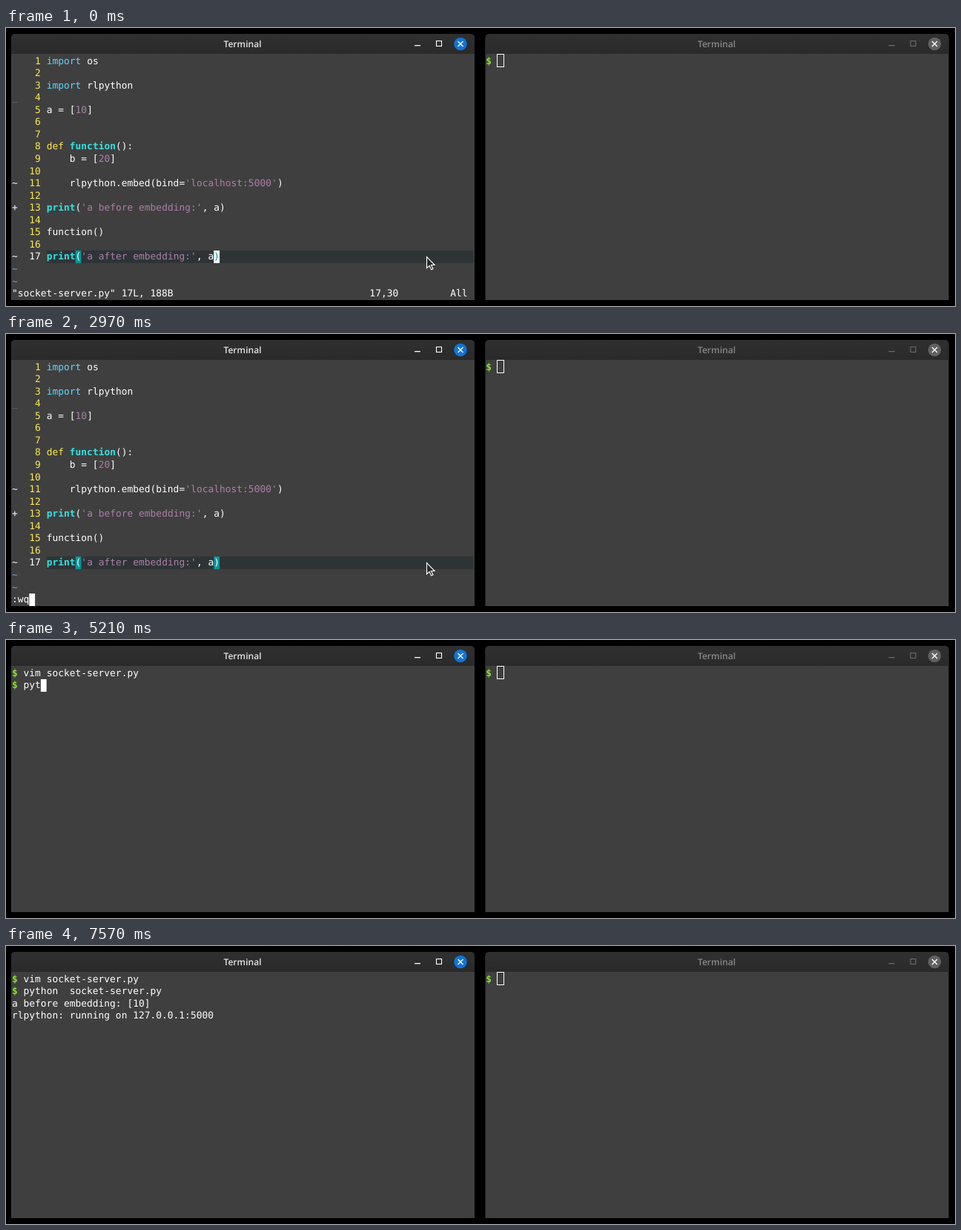
Recreate the animation shown at these times as an HTML page. Size 1280 px wide and 376 px high, loop 8000 ms.

```html
<!DOCTYPE html>
<html lang="en">
<head>
<meta charset="utf-8">
<title>Terminal</title>
<style>
  html, body { margin: 0; width: 100%; height: 100%; overflow: hidden; background: #000; }
  svg { display: block; width: 1280px; height: 376px; }
  text { white-space: pre; text-rendering: geometricPrecision; }
  .mono { font: 12.925px "DejaVu Sans Mono", monospace; fill: #fff; }
  .title { font: 600 12.1px "Open Sans", "Noto Sans", sans-serif; text-anchor: middle; }
  .mono.bold { font-weight: 700; }
</style>
</head>
<body>
<svg id="stage" viewBox="0 0 1280 376">
  <defs>
    <linearGradient id="bar" x2="0" y2="1">
      <stop offset="0" stop-color="#303030"/>
      <stop offset="1" stop-color="#2a2a2a"/>
    </linearGradient>
  </defs>
</svg>
<script>
const CELL = 7.78, LINE = 16.55, TOP = 36.3, BASE = 12.3;
const LEFT = 8, RIGHT = 647.3, LOOP = 8000;
const C = {
  white: '#fff', yellow: '#fce94f', cyan: '#34e2e2', sky: '#5fd7ff', string: '#ad7fa8',
  teal: '#06989a', blue: '#729fcf', green: '#8ae234', current: '#2e3436', dim: '#777'
};
const stage = document.getElementById('stage');

function add(parent, tag, attrs, content = '') {
  const node = document.createElementNS('http://www.w3.org/2000/svg', tag);
  for (const key in attrs) node.setAttribute(key, attrs[key]);
  node.textContent = content;
  return parent.appendChild(node);
}

const group = () => add(stage, 'g', {});
const show = (node, on) => node.setAttribute('visibility', on ? 'visible' : 'hidden');

function put(parent, row, col, content, fill = C.white, bold = false, left = LEFT) {
  return add(parent, 'text', {
    class: bold ? 'mono bold' : 'mono', style: `fill:${fill}`,
    x: left + col * CELL, y: TOP + row * LINE + BASE
  }, content);
}

function block(parent, row, col, fill, cells = 1) {
  const y = Math.round(TOP + row * LINE);
  return add(parent, 'rect', {
    x: LEFT + col * CELL, y, width: cells * CELL,
    height: Math.round(TOP + (row + 1) * LINE) - y, fill
  });
}

function frame(x, titleFill, iconFill, closeFill) {
  add(stage, 'path', { d: `M${x} 368V14q0-6 6-6h613q6 0 6 6v354z`, fill: '#3f3f3f' });
  add(stage, 'path', { d: `M${x} 35V14q0-6 6-6h613q6 0 6 6v21z`, fill: 'url(#bar)' });
  add(stage, 'text', { class: 'title', x: x + 312, y: 26, fill: titleFill }, 'Terminal');
  add(stage, 'rect', { x: x + 544, y: 23, width: 8, height: 1.3, fill: iconFill });
  add(stage, 'rect', {
    x: x + 573.5, y: 17.5, width: 7, height: 7, fill: 'none', stroke: iconFill, 'stroke-width': 1.1
  });
  add(stage, 'circle', { cx: x + 606, cy: 21.5, r: 8.7, fill: closeFill });
  add(stage, 'path', {
    d: `M${x + 602.5} 18l7 7m0-7l-7 7`, stroke: '#fff', 'stroke-width': 1.4, fill: 'none'
  });
}

frame(7, '#e4e4e4', '#fff', '#1074d8');
frame(646.5, '#888', '#6a6a6a', '#616161');
put(stage, 0, 0, '$', C.green, true, RIGHT);
add(stage, 'rect', { x: 662.5, y: 35.5, width: 9, height: 17, fill: 'none', stroke: '#fff' });

// Editor
const source = `import os

import rlpython

a = [10]


def function():
    b = [20]

    rlpython.embed(bind='localhost:5000')

print('a before embedding:', a)

function()

print('a after embedding:', a)`.split('\n');

const TOKENS = /'[^']*'|\d+|^import|^def|^print|(?<=def )\w+|[^'\d]+?(?=['\d]|$|(?<=def )\w)/g;

function style(token) {
  if (/^['\d]/.test(token)) return [C.string];
  if (token === 'import') return [C.sky];
  if (token === 'def') return [C.yellow];
  if (token === 'print' || token === 'function') return [C.cyan, true];
  return [C.white];
}

const editor = group();
block(editor, 16, 6, C.current, 74);
block(editor, 16, 11, C.teal);
block(editor, 16, 35, C.teal);
source.forEach((line, row) => {
  put(editor, row, 2, String(row + 1).padStart(3), row === 16 ? C.white : C.yellow);
  if (line === 'function()') return put(editor, row, 6, line);
  for (const match of line.matchAll(TOKENS)) {
    put(editor, row, 6 + match.index, match[0], ...style(match[0]));
  }
});
put(editor, 3, 0, '_', C.dim);
put(editor, 10, 0, '~');
put(editor, 12, 0, '+');
put(editor, 16, 0, '~');
put(editor, 17, 0, '~', C.blue);
put(editor, 18, 0, '~', C.blue);
const status = add(editor, 'g', {});
put(status, 19, 0, '"socket-server.py" 17L, 188B');
put(status, 19, 62, '17,30');
put(status, 19, 76, 'All');
const command = put(editor, 19, 0, '');
add(editor, 'path', {
  d: 'M567.5 309.5v15.2l3.6-3.3 2.5 5.4 2.4-1.1-2.5-5.2h4.6z',
  fill: '#292929', stroke: '#fff', 'stroke-width': 1.1
});

// Shell
const shell = group();
put(shell, 0, 0, '$', C.green, true);
put(shell, 0, 2, 'vim socket-server.py');
put(shell, 1, 0, '$', C.green, true);
const typed = put(shell, 1, 2, '');
const output = add(shell, 'g', {});
put(output, 2, 0, 'a before embedding: [10]');
put(output, 3, 0, 'rlpython: running on 127.0.0.1:5000');

const cursor = block(stage, 0, 0, '#fff');
const underCursor = put(stage, 16, 35, ')', C.teal);

// Each row: start time, view, typed text, cursor shown
const run = 'python  socket-server.py';
const steps = [
  [0, 'edit', '', true], [80, 'edit', '', false],
  [660, 'edit', '', true], [1320, 'edit', '', false], [1900, 'edit', '', true],
  [2650, 'command', ':', true], [2970, 'command', ':wq', true],
  [3490, 'shell', '', true], [4070, 'shell', '', false], [4640, 'shell', '', true],
  [4970, 'shell', 'p', true], [5130, 'shell', 'py', true], [5210, 'shell', 'pyt', true],
  [5290, 'shell', 'pyth', true], [5360, 'shell', 'pytho', true], [5440, 'shell', 'python', true],
  [5590, 'shell', 'python ', true], [6170, 'shell', run, true], [6830, 'shell', run, false],
  [6990, 'output', run, true], [7570, 'output', run, false]
];

function cursorCell(view, content) {
  if (view === 'edit') return [16, 35];
  if (view === 'command') return [19, content.length];
  if (view === 'shell') return [1, 2 + content.length];
  return [4, 0];
}

let current;
function render(time) {
  const step = steps.findLast(([start]) => start <= time);
  if (step === current) return;
  current = step;
  const [, view, content, lit] = step;
  const editing = view === 'edit' || view === 'command';
  editor.style.display = editing ? '' : 'none';
  shell.style.display = editing ? 'none' : '';
  show(status, view === 'edit');
  show(output, view === 'output');
  command.textContent = view === 'command' ? content : '';
  typed.textContent = editing ? '' : content;
  const [row, col] = cursorCell(view, content);
  cursor.setAttribute('x', LEFT + col * CELL);
  cursor.setAttribute('y', Math.round(TOP + row * LINE));
  show(cursor, lit);
  show(underCursor, view === 'edit' && lit);
}

const began = performance.now();
function tick() {
  render((performance.now() - began) % LOOP);
  requestAnimationFrame(tick);
}
tick();
</script>
</body>
</html>
```
